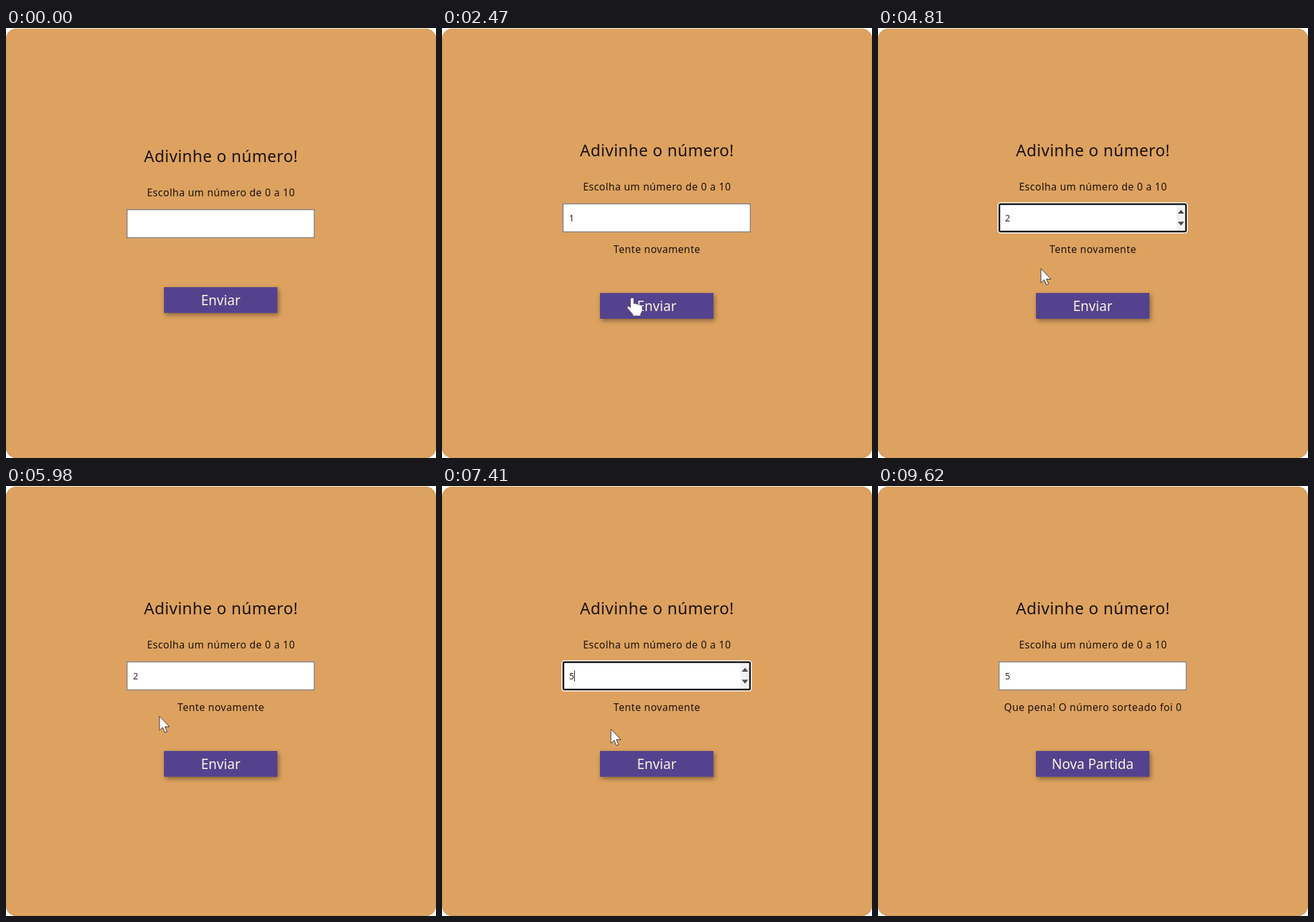
An HTML page for the animation above (9.75 s loop, 667 by 667 pixels).

```html
<!DOCTYPE html>
<html lang="pt">
<meta charset="utf-8">
<title>Adivinhe o número!</title>
<style>
  html, body { margin: 0; width: 100%; height: 100%; overflow: hidden; background: #fff; }
  #stage {
    position: absolute; left: 0; top: 0; width: 667px; height: 667px; isolation: isolate;
    color: #1c1210; font: 15.6px "Noto Sans", "Open Sans", sans-serif; --up: 0px;
  }
  #stage::before {
    content: ""; position: absolute; inset: 1px 0 0; z-index: -1; border-radius: 16px;
    background: #dda25f; box-shadow: inset 0 0 0 1px #cd9a5e;
  }
  #stage.answered { --up: 9px; }
  .line {
    position: absolute; left: 0; width: 667px; line-height: 40px;
    text-align: center; letter-spacing: .5px; white-space: pre;
  }
  #title { top: calc(178px - var(--up)); font-size: 25px; }
  #hint { top: calc(235px - var(--up)); }
  #message { top: 323px; }
  #button {
    position: absolute; left: 245px; top: calc(402px + var(--up)); width: 176px; height: 40px;
    background: #54428e; color: #fcf2e0; font-size: 21px; font-weight: 500;
    line-height: 40px; text-align: center; box-shadow: 2px 3px 7px #0006;
  }
  #field {
    position: absolute; left: 187px; top: calc(280.5px - var(--up)); width: 292px; height: 45px;
    background: #fff; box-shadow: inset 0 0 0 1.5px #857d85;
  }
  #field.focus { border-radius: 3px; box-shadow: inset 0 0 0 2.5px #100c10, 0 0 0 1.5px #fff; }
  #value {
    position: absolute; left: 10px; top: 3px; height: 39px;
    font-size: 14px; line-height: 39px; color: #3a2222;
  }
  #value.selected { background: #3f77d6; color: #fff; }
  #value.caret::after {
    content: ""; position: absolute; right: -1px; top: 11px; width: 1.2px; height: 17px; background: #111;
  }
  #spinner { position: absolute; left: 275.5px; top: 3px; background: #f1f1f1; fill: #4d4a4a; }
  svg { overflow: visible; }
  #cursor { position: absolute; left: 0; top: 0; fill: #fff; stroke: #3b2f30; stroke-linejoin: round; }
</style>
<div id="stage">
  <div id="title" class="line">Adivinhe o número!</div>
  <div id="hint" class="line">Escolha um número de 0 a 10</div>
  <div id="field">
    <span id="value"></span>
    <svg id="spinner" width="13.5" height="39"><path d="M2 13l5-6 5 6zM2 25.5l5 6 5-6z"/></svg>
  </div>
  <div id="message" class="line"></div>
  <div id="button"></div>
  <svg id="cursor" width="30" height="30">
    <path id="arrow" d="M0 0V22L5 17.5L8.5 25.5L12 24L8.5 16.5H15.5Z"/>
    <path id="hand" stroke-width=".5" d="M-2.5 2Q-2.5-.5 0-.5T2.5 2V9Q5 7.5 7 9.5Q9.5 8.5 11 11Q15 10 15.5 14V19Q15 22 13 24V27.5H1V25L-7 16Q-8.5 13-5.5 12.5L-2.5 15Z"/>
  </svg>
</div>
<script>
const LOOP = 9750, STEP = 130;
const el = Object.fromEntries([...document.querySelectorAll("[id]")].map(e => [e.id, e]));

const away = [400, 720], field = [262, 303], button = [295, 419];
const beside = [180, 293], below = [238, 357], nearButton = [262, 377];

// Pointer glides: start, end, destination
const glides = [
  [390, 650, field], [2080, 2340, button], [2990, 3640, beside],
  [3770, 4290, below], [4810, 5070, button], [5850, 5980, below], [6110, 6760, beside],
  [7150, 7410, nearButton], [7670, 7670, button], [9230, 9620, away]
];

// Each guess is focused and selected shortly before its digit is typed
const guesses = [
  { digit: "1", typed: 1820, sent: 2470 },
  { digit: "2", typed: 4290, sent: 5200 },
  { digit: "5", typed: 7150, sent: 8060 }
];
const FOCUS_LEAD = 780, SELECT_LEAD = 650;
const replies = ["", "Tente novamente", "Tente novamente", "Que pena! O número sorteado foi 0"];

const ease = p => p * p * (3 - 2 * p);
const inside = ([x, y], left, top, w, h) => x >= left && x < left + w && y >= top && y < top + h;
const show = (e, on) => e.style.visibility = on ? "visible" : "hidden";

function pointerAt(t) {
  return glides.reduce((from, [start, end, to]) => {
    const p = ease(Math.min(1, Math.max(0, (t - start + STEP) / (end - start + STEP))));
    return from.map((v, i) => v + (to[i] - v) * p);
  }, away);
}

function draw(t) {
  const sent = guesses.filter(g => t >= g.sent).length, up = sent ? 9 : 0;
  const text = guesses.findLast(g => t >= g.typed)?.digit ?? "";
  const guess = guesses.find(g => t >= g.typed - FOCUS_LEAD && t < g.sent);
  const selected = guess && t >= guess.typed - SELECT_LEAD && t < guess.typed;
  const caret = guess && !selected && (t < guess.typed || (t - guess.typed) % 1000 < 500);
  const pos = pointerAt(t);
  const onField = inside(pos, 188, 281 - up, 290, 44);
  const onButton = inside(pos, 245, 402 + up, 176, 40);

  el.stage.classList.toggle("answered", sent > 0);
  el.message.textContent = replies[sent];
  el.button.textContent = sent === guesses.length ? "Nova Partida" : "Enviar";

  el.value.textContent = text;
  el.value.classList.toggle("selected", !!selected);
  el.value.classList.toggle("caret", !!caret);
  el.field.classList.toggle("focus", !!guess);
  show(el.spinner, guess || onField);

  el.cursor.style.transform = `translate(${pos[0]}px, ${pos[1]}px)`;
  show(el.hand, onButton);
  show(el.arrow, !onButton && !onField);
}

function tick() {
  const t = performance.now() % LOOP;
  draw(t - t % STEP);
  requestAnimationFrame(tick);
}
tick();
</script>
</html>
```
